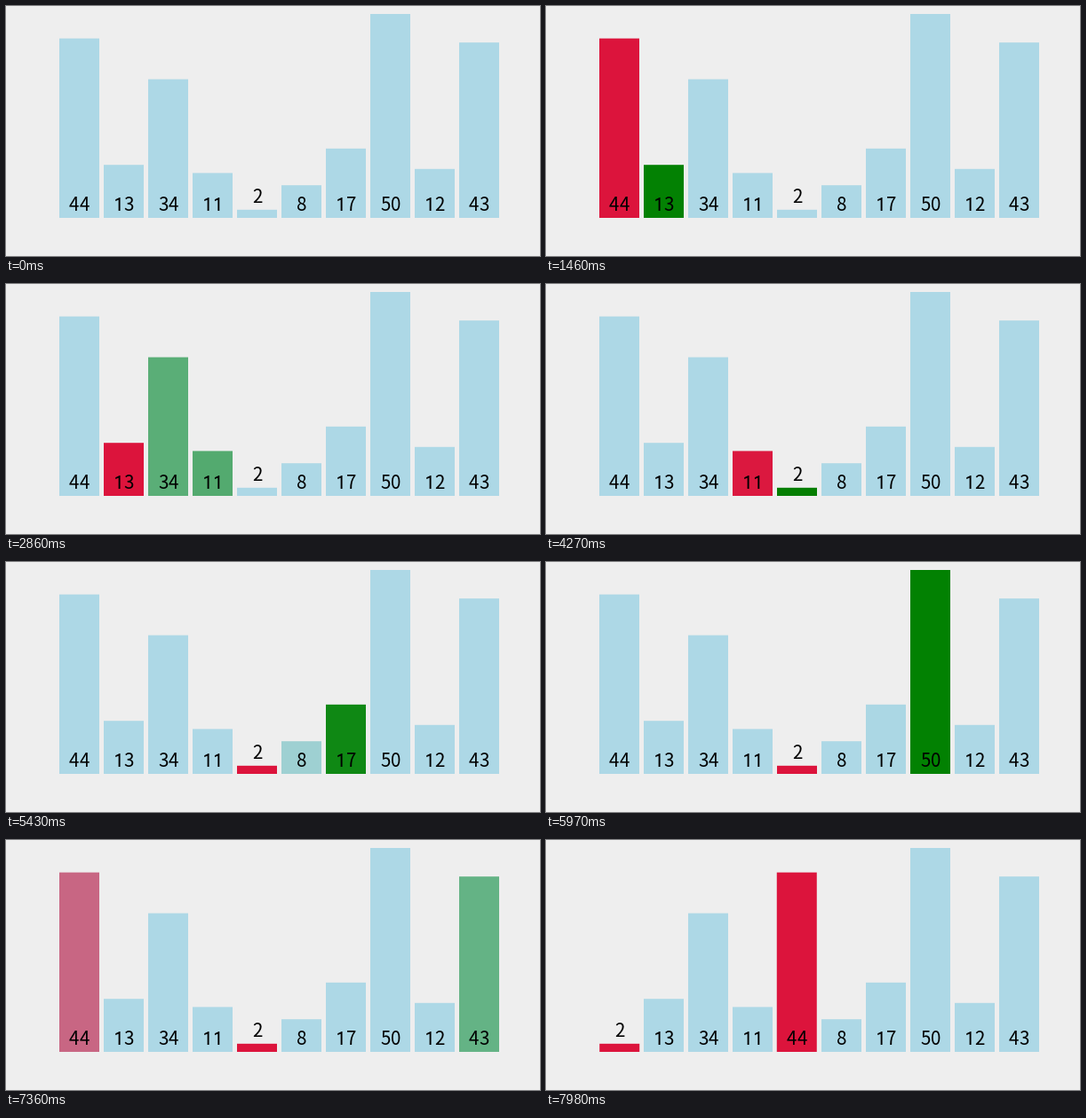
A matplotlib script for the animation above (8 s loop, 601x282 px).

```python
import math

import matplotlib.pyplot as plt
import numpy as np
from matplotlib.animation import FuncAnimation
from matplotlib.colors import to_rgb
from matplotlib.patches import Polygon, Rectangle
from matplotlib.transforms import Affine2D

W, H, DPI = 601, 282, 64
LOOP, INTERVAL = 8000, 20

VALUES = [44, 13, 34, 11, 2, 8, 17, 50, 12, 43]
LEFT, PITCH, BAR_W, FLOOR, UNIT = 60, 50, 45, 239, 4.6
PLAIN, CHECK, LOWEST = (np.array(to_rgb(c)) for c in ("lightblue", "green", "crimson"))

START, PERIOD, FADE = 708, 500, 300   # ms: first step, step spacing, transition
TICK, LEAD = 77.7, 15                 # the picture refreshes once per tick

FONT_PX, ADVANCE = 20.5, 11.7
ONE = np.array([(0, 0), (0, -12.4), (-3.4, -10.9), (-3.4, -12.8),
                (1.2, -15), (1.9, -15), (1.9, 0)])


def selection_pass(values):
    """States of one pass: (highlight colours by bar, slot of each bar)."""
    slots = list(range(len(values)))
    states = [({}, slots), ({0: LOWEST}, slots)]
    low = 0
    for j in range(1, len(values)):
        states.append(({low: LOWEST, j: CHECK}, slots))
        if values[j] < values[low]:
            low = j
            states.append(({low: LOWEST}, slots))
    marks = {0: LOWEST, low: LOWEST}
    swapped = slots.copy()
    swapped[0], swapped[low] = low, 0
    return states + [(marks, slots), (marks, swapped)]


def ease(t):
    t = min(max(t, 0), 1)
    return 4 * t ** 3 if t < 0.5 else 1 - 4 * (1 - t) ** 3


fig = plt.figure(figsize=(W / DPI, H / DPI), dpi=DPI, facecolor="#eeeeee")
ax = fig.add_axes([0, 0, 1, 1])
ax.set_xlim(0, W)
ax.set_ylim(H, 0)
ax.axis("off")


def add_digit(char, x, y, transform):
    if char == "1":
        ax.add_patch(Polygon(ONE + (x, y), color="black", lw=0, zorder=3,
                             transform=transform))
    else:
        ax.text(x, y, char, family="Noto Sans CJK JP", size=FONT_PX * 72 / DPI,
                ha="center", va="baseline", color="black", zorder=3,
                transform=transform)


def add_bar(value):
    """Draw a bar with its label at x = 0; return it and its movable shift."""
    shift = Affine2D()
    transform = shift + ax.transData
    height = value * UNIT
    bar = Rectangle((0, FLOOR - height), BAR_W, height, lw=0, snap=False,
                    zorder=2, transform=transform)
    ax.add_patch(bar)
    base = FLOOR - 8 if height > 20 else FLOOR - height - 7.8
    label = str(value)
    for k, char in enumerate(label):
        x = BAR_W / 2 + (k - (len(label) - 1) / 2) * ADVANCE
        add_digit(char, x, base, transform)
    return bar, shift


STATES = selection_pass(VALUES)
bars = [add_bar(v) for v in VALUES]


def draw(frame):
    shown = math.floor((frame * INTERVAL + INTERVAL / 2 + LEAD) / TICK) * TICK - LEAD
    step = math.floor((shown - START) / PERIOD)
    step = min(max(step, 0), len(STATES) - 2)
    p = ease((shown - START - step * PERIOD) / FADE)
    (marks_a, slots_a), (marks_b, slots_b) = STATES[step], STATES[step + 1]
    for i, (bar, shift) in enumerate(bars):
        a, b = marks_a.get(i, PLAIN), marks_b.get(i, PLAIN)
        bar.set_facecolor(a + (b - a) * p)
        slot = slots_a[i] + (slots_b[i] - slots_a[i]) * p
        shift.clear().translate(LEFT + PITCH * slot, 0)
    return [bar for bar, _ in bars]


anim = FuncAnimation(fig, draw, frames=LOOP // INTERVAL, interval=INTERVAL,
                     repeat=True, repeat_delay=0, blit=False)
plt.show()
```
